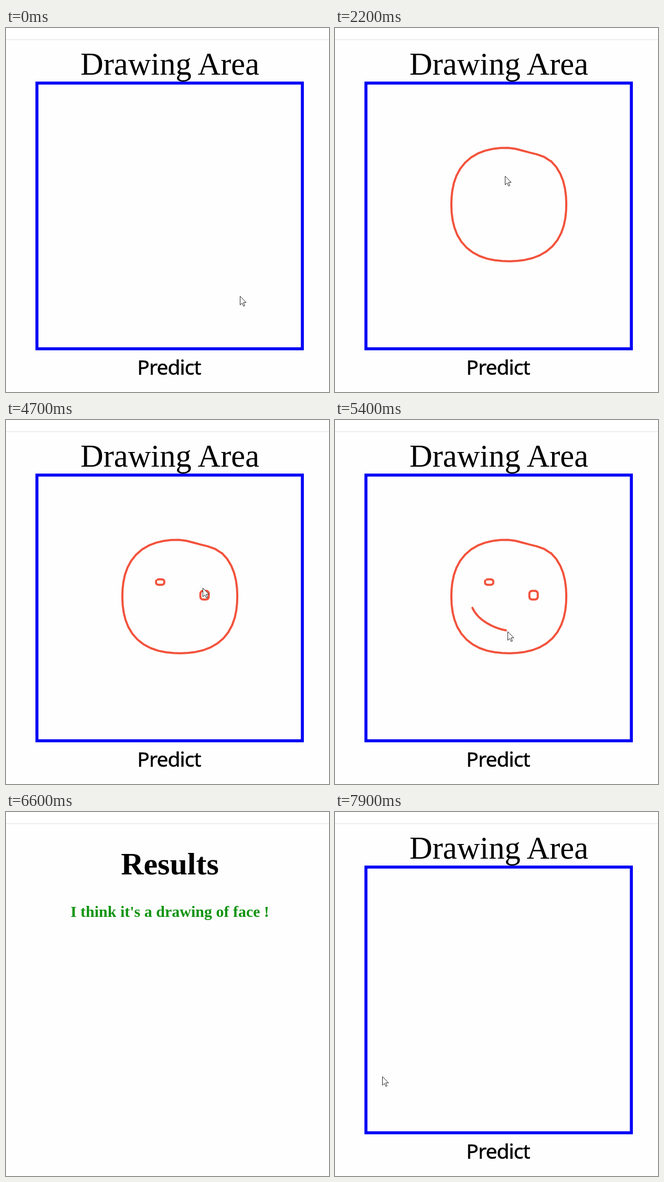
These frames come from a looping animation (616 by 694 pixels, 8 s). An HTML page:

```html
<!DOCTYPE html>
<html lang="en">
<head>
<meta charset="utf-8">
<title>Drawing Area</title>
<style>
  html, body { margin: 0; width: 100%; height: 100%; overflow: hidden; background: #fefefe; }
  svg { display: block; width: 616px; height: 694px; }
  .serif { font-family: "Liberation Serif", "Times New Roman", serif; text-anchor: middle; }
  .button { font: 39px "Noto Sans", sans-serif; letter-spacing: -0.9px; stroke: #000; stroke-width: 0.5; }
  .ink path { fill: none; stroke: #f2523c; stroke-width: 4; stroke-linecap: round; stroke-linejoin: round; }
</style>
</head>
<body>
<svg viewBox="0 0 616 694">
  <rect width="616" height="22" fill="#fff"/>
  <rect y="21.5" width="616" height="1.2" fill="#e4e4e4"/>
  <g id="drawPage">
    <text class="serif" x="312.5" y="88.6" font-size="60.5">Drawing Area</text>
    <rect x="59" y="105" width="506.2" height="506.6" fill="none" stroke="#0000f6" stroke-width="5.7"/>
    <text class="button" x="250.3" y="660.6">Predict</text>
    <g class="ink" id="ink"></g>
  </g>
  <g id="resultPage" font-weight="bold">
    <text class="serif" x="312.5" y="119" font-size="60">Results</text>
    <text class="serif" x="312.5" y="200" font-size="30" fill="#0f930f">I think it's a drawing of face !</text>
  </g>
  <path id="cursor" d="M.5 .5V17L4.3 13.4 7 19.3 9.4 18.3 6.8 12.3H12Z" fill="#fff" stroke="#222" stroke-width="1"/>
</svg>
<script>
const LOOP = 8000, STEP = 100;
const RESULT_START = 6300, RESULT_END = 7200;
const CURSOR_HIDE = 6600, CURSOR_SHOW = 7700;
const PEN_LAG = { x: 3, y: 2 };
const $ = id => document.getElementById(id);

// A hand-drawn loop, counterclockwise from startAngle (degrees); `square` bulges its diagonals.
function loopPath({ cx, cy, rx, ry, startAngle, turns = 1, square = 0, dent = () => 0 }) {
  const count = 48;
  const points = Array.from({ length: count + 1 }, (_, i) => {
    const degrees = startAngle - 360 * turns * i / count;
    const angle = degrees * Math.PI / 180;
    const scale = 1 - square * Math.cos(4 * angle) - dent(degrees);
    return `${cx + rx * scale * Math.cos(angle)} ${cy + ry * scale * Math.sin(angle)}`;
  });
  return "M" + points.join("L");
}

// The head is slightly flattened at its upper right.
const headDent = degrees => 0.045 * Math.exp(-(((degrees + 69) / 15) ** 2));

const strokes = [
  { // head
    start: 700, end: 1600, pace: 1.7,
    d: loopPath({ cx: 331.5, cy: 336.3, rx: 112.8, ry: 111.5, startAngle: -46, square: 0.028, dent: headDent })
  },
  { // left eye
    start: 2500, end: 3000, pace: 1,
    d: loopPath({ cx: 294, cy: 309, rx: 8.3, ry: 5.6, startAngle: -150, turns: 0.92, square: 0.05 })
  },
  { // right eye
    start: 4300, end: 4600, pace: 1,
    d: loopPath({ cx: 378.7, cy: 334, rx: 8.6, ry: 8.8, startAngle: -100, square: 0.07 })
  },
  { // mouth
    start: 5100, end: 5600, pace: 1,
    d: "M262 358C275 388 318 402 335 402H361L373 389"
  }
];

for (const stroke of strokes) {
  stroke.path = document.createElementNS("http://www.w3.org/2000/svg", "path");
  stroke.path.setAttribute("d", stroke.d);
  $("ink").append(stroke.path);
  stroke.length = stroke.path.getTotalLength();
}

function penAt({ path, length }, part) {
  const pen = path.getPointAtLength(length * part);
  return { x: pen.x + PEN_LAG.x, y: pen.y + PEN_LAG.y };
}

// Between strokes the cursor glides from stop to stop.
const stops = [
  { time: 0, x: 446, y: 511 },
  { time: 500, ...penAt(strokes[0], 0) },
  { time: 2200, x: 324, y: 282 },
  { time: 3500, x: 374, y: 319 },
  { time: 4200, x: 374, y: 319 },
  { time: 4700, x: 375, y: 320 },
  { time: 6000, x: 288, y: 643 },
  { time: 7700, x: 54, y: 490 },
  { time: 7900, x: 90, y: 504 },
  ...strokes.flatMap(stroke => [
    { time: stroke.start, ...penAt(stroke, 0) },
    { time: stroke.end, ...penAt(stroke, 1) }
  ])
].sort((a, b) => a.time - b.time);

function glide(t) {
  const next = stops.findIndex(stop => stop.time > t);
  if (next < 0) return stops[stops.length - 1];
  const from = stops[next - 1], to = stops[next];
  const k = (t - from.time) / (to.time - from.time);
  return { x: from.x + (to.x - from.x) * k, y: from.y + (to.y - from.y) * k };
}

const clamp = value => Math.min(1, Math.max(0, value));

function show(element, visible) {
  element.style.visibility = visible ? "inherit" : "hidden";
}

function render(t) {
  const results = t >= RESULT_START && t < RESULT_END;
  show($("drawPage"), !results);
  show($("resultPage"), results);

  // The cursor rests on the button until the results have loaded.
  let cursor = t < CURSOR_HIDE ? glide(Math.min(t, 6000)) : glide(t);
  for (const stroke of strokes) {
    const { path, length, start, end, pace } = stroke;
    const part = clamp((t - start) / (end - start)) ** pace;
    show(path, part > 0 && t < RESULT_START);
    path.style.strokeDasharray = part < 1 ? `${length * part} ${length * 2}` : "none";
    if (part > 0 && part < 1) cursor = penAt(stroke, part);
  }
  $("cursor").setAttribute("transform", `translate(${Math.round(cursor.x)} ${Math.round(cursor.y)})`);
  show($("cursor"), t < CURSOR_HIDE || t >= CURSOR_SHOW);
}

const startTime = performance.now();
function frame() {
  const elapsed = (performance.now() - startTime) % LOOP;
  render(Math.floor(elapsed / STEP) * STEP);
  requestAnimationFrame(frame);
}
frame();
</script>
</body>
</html>
```
